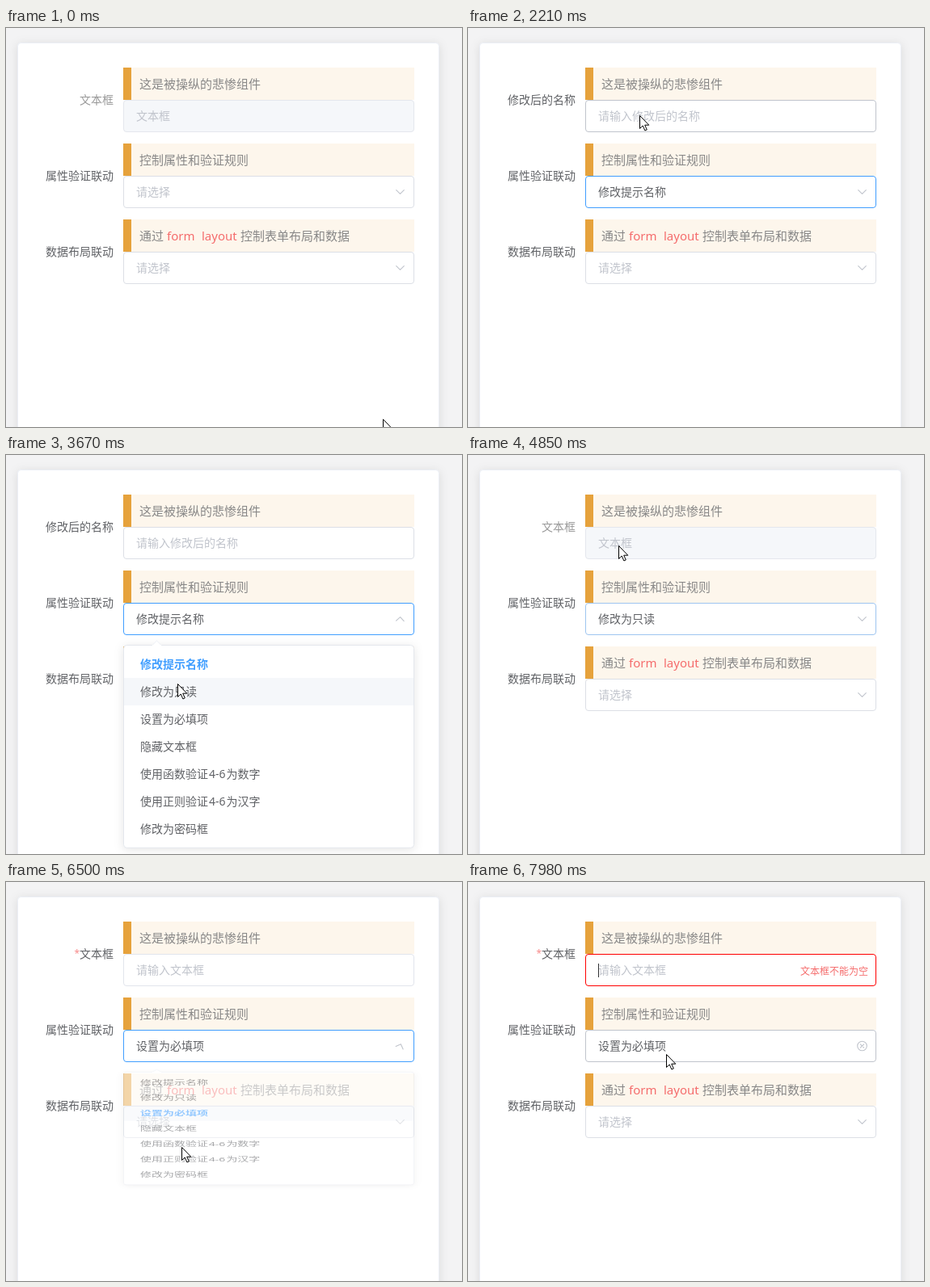
An HTML page for the animation above (8 s loop, 564x494 px).

```html
<!DOCTYPE html>
<html lang="zh-CN">
<head>
<meta charset="utf-8">
<title>表单联动</title>
<style>
html, body { margin: 0; width: 100%; height: 100%; overflow: hidden; background: #f3f3f4; }
svg { display: block; width: 564px; height: 494px; }
text { font: 14px "Noto Sans", "Noto Sans CJK SC", "Noto Sans CJK", sans-serif; fill: #606266; white-space: pre; }
.tip { font-size: 15px; fill: #888; }
.hint { fill: #c0c4cc; }
.red { fill: #f56c6c; }
.small { font-size: 12px; }
.icon { fill: none; stroke: #c0c4cc; stroke-width: 1.1; stroke-linecap: round; stroke-linejoin: round; }
.shadow { filter: drop-shadow(0 2px 6px rgba(0, 0, 0, .1)); }
</style>
</head>
<body>
<svg id="stage" viewBox="0 0 564 494"></svg>
<script>
const LOOP = 8000, STEP = 73;
const OPTIONS = ['修改提示名称', '修改为只读', '设置为必填项', '隐藏文本框',
  '使用函数验证4-6为数字', '使用正则验证4-6为汉字', '修改为密码框'];
const PLAIN = [220, 223, 230], HOVER = [192, 196, 204], BLUE = [64, 158, 255],
  OFF = [228, 231, 237], RED = [255, 0, 0];

// Pointer: start position, then moves as start, end, x, y
const HOME = [466, 484];
const MOVES = [
  [60, 280, 265, 177], [420, 560, 225, 208], [720, 940, 212, 240], [1020, 1300, 212, 253],
  [1460, 1960, 212, 105], [2060, 2430, 212, 117], [2570, 3310, 214, 205], [3450, 3650, 212, 283],
  [4120, 4700, 186, 112], [5080, 5400, 205, 205], [5500, 5810, 217, 328],
  [6500, 6860, 230, 97], [7400, 7680, 245, 213]];

const OPENED = [715, 3400, 5490], PICKED = [1445, 4100, 6463], INPUT_CLICKED = [4710, 6860];
const FAILED = INPUT_CLICKED[1];

// Field state for each chosen option; -1 means nothing chosen
const FIELD = {
  '-1': { label: '文本框', hint: '文本框', off: true },
  0: { label: '修改后的名称', hint: '请输入修改后的名称' },
  1: { label: '文本框', hint: '文本框', off: true },
  2: { label: '文本框', hint: '请输入文本框', must: true }
};

const clamp = v => Math.max(0, Math.min(1, v));
const mix = (a, b, p) => a + (b - a) * p;
const smooth = p => p * p * (3 - 2 * p);
const last = (times, t) => Math.max(-Infinity, ...times.filter(v => v <= t));

function bezier(x1, y1, x2, y2) {
  const at = (a, b, s) => 3 * a * s * (1 - s) ** 2 + 3 * b * s * s * (1 - s) + s ** 3;
  return v => {
    const x = clamp(v);
    let lo = 0, hi = 1;
    for (let i = 0; i < 24; i++) {
      const mid = (lo + hi) / 2;
      if (at(x1, x2, mid) < x) lo = mid; else hi = mid;
    }
    return at(y1, y2, hi);
  };
}
const zoomEase = bezier(.23, 1, .32, 1);
const turnEase = bezier(.25, .1, .25, 1);

function pointerAt(t) {
  let [x, y] = HOME;
  for (const [start, end, toX, toY] of MOVES) {
    const p = smooth(clamp((t - start) / (end - start)));
    x = mix(x, toX, p);
    y = mix(y, toY, p);
  }
  return [Math.round(x), Math.round(y)];
}

function isOver(top, t) {
  const [x, y] = pointerAt(t);
  return x > 145 && x < 505 && y >= top && y < top + 40;
}

const chosen = t => PICKED.filter(v => v <= t).length - 1;

function selectBorder(t) {
  if (last(OPENED, t) > last(INPUT_CLICKED, t)) return BLUE;
  return isOver(183, t) ? HOVER : PLAIN;
}

function inputBorder(t) {
  if (FIELD[chosen(t)].off) return OFF;
  if (t >= FAILED) return RED;
  return isOver(89, t) ? HOVER : PLAIN;
}

// A 200 ms colour fade: the mean of the border's recent states
function faded(border, t) {
  const sum = [0, 0, 0], n = 10;
  for (let k = 0; k < n; k++) border(t - 20 * k).forEach((v, i) => sum[i] += v / n);
  return `rgb(${sum.map(Math.round)})`;
}

const label = (y, str) => `<text x="133" y="${y + 5}" text-anchor="end">${str}</text>`;
const tip = (y, inner) =>
  `<path d="M145 ${y}h360v40h-360z" fill="#fdf6ec"/><path d="M145 ${y}h10v40h-10z" fill="#e6a23c"/>
   <text class="tip" x="165" y="${y + 26}">${inner}</text>`;
const box = (y, id) =>
  `<rect id="${id}" x="145.5" y="${y + .5}" width="359" height="39" rx="3.5" fill="#fff" stroke="rgb(${PLAIN})"/>
   <text id="${id}Text" class="hint" x="161" y="${y + 25}">请选择</text>`;
const chevron = (y, id) =>
  `<path id="${id}" class="icon" d="M-4.8 2.4L0 -2.4L4.8 2.4" transform="translate(487.5 ${y}) rotate(180)"/>`;
const option = (str, i) => `<text class="option" x="166" y="${264 + 34 * i}">${
  str.replace(/(4-6)(.*)/, '<tspan dx="1">$1</tspan><tspan dx="1">$2</tspan>')}</text>`;

const stage = document.getElementById('stage');
stage.innerHTML = `
  <rect width="564" height="494" fill="#f3f3f4"/>
  <rect class="shadow" x="14.5" y="18.5" width="521" height="520" rx="4" fill="#fff" stroke="#ebeef5"/>
  <text id="name" x="133" y="94" text-anchor="end"></text>
  <text id="star" class="red small" x="91" y="93" text-anchor="end" opacity=".8">*</text>
  ${tip(49, '这是被操纵的悲惨组件')}${box(89, 'input')}
  <path id="caret" d="M161.5 101v17" stroke="#303133"/>
  <text id="error" class="red small" x="411" y="114.5">文本框不能为空</text>
  ${label(183, '属性验证联动')}${tip(143, '控制属性和验证规则')}${box(183, 'select')}
  ${chevron(203, 'arrow')}
  <g id="clear" class="icon"><circle cx="487.5" cy="203" r="5.8"/><path d="M485.3 200.8l4.4 4.4m0 -4.4l-4.4 4.4"/></g>
  ${label(277, '数据布局联动')}
  ${tip(237, '通过<tspan class="red" x="199">form</tspan><tspan class="red" x="242">layout</tspan><tspan x="290">控制表单布局和数据</tspan>')}
  ${box(277, 'layout')}${chevron(297, 'layoutArrow')}
  <g id="menu">
    <rect class="shadow" x="145.5" y="235.5" width="359" height="251" rx="4" fill="#fff" stroke="#e4e7ed"/>
    <path d="M180.5 236l6 -6l6 6" fill="#fff" stroke="#ebeef5"/><path d="M181 235h11v2h-11z" fill="#fff"/>
    <rect id="row" x="146" width="358" height="34" fill="#f5f7fa"/>
    ${OPTIONS.map(option).join('')}
  </g>
  <path id="pointer" d="M0 0V16L3.7 12.5L6.4 18.5L8.8 17.4L6.2 11.7H11.3Z" fill="#fff" stroke="#000"/>`;

const el = {};
stage.querySelectorAll('[id]').forEach(e => el[e.id] = e);
const rows = [...stage.querySelectorAll('.option')];
const set = (e, attrs) => { for (const k in attrs) e.setAttribute(k, attrs[k]); };
const show = (e, on) => set(e, { visibility: on ? 'visible' : 'hidden' });

function drawField(t, value) {
  const field = FIELD[value];
  el.name.textContent = field.label;
  el.name.style.fill = field.off ? '#999' : '';
  show(el.star, field.must);
  el.inputText.textContent = field.hint;
  set(el.input, { fill: field.off ? '#f5f7fa' : '#fff', stroke: faded(inputBorder, t) });
  show(el.error, t >= FAILED);
  show(el.caret, t >= FAILED && Math.floor((t - FAILED) / 530) % 2 === 0);
}

function drawSelect(t, value, turn) {
  el.selectText.textContent = OPTIONS[value] || '请选择';
  el.selectText.style.fill = value < 0 ? '' : '#606266';
  set(el.select, { stroke: faded(selectBorder, t) });
  const clearable = value >= 0 && isOver(183, t);
  show(el.clear, clearable);
  show(el.arrow, !clearable);
  set(el.arrow, { transform: `translate(487.5 203) rotate(${turn})` });
}

function drawMenu(value, size, open, y) {
  show(el.menu, size > .002);
  set(el.menu, { opacity: size, transform: `translate(0 235) scale(1 ${size}) translate(0 -235)` });
  const over = Math.floor((y - 242) / 34);
  const active = open && OPTIONS[over] ? over : value;
  set(el.row, { y: 242 + 34 * active, opacity: active < 0 ? 0 : 1 });
  rows.forEach((r, i) => {
    r.style.fill = i === value ? '#409eff' : '';
    r.style.fontWeight = i === value ? 700 : 400;
  });
}

function draw(time) {
  const t = Math.floor(time / STEP) * STEP;
  const [x, y] = pointerAt(t);
  const value = chosen(t);
  const opened = last(OPENED, t), picked = last(PICKED, t);
  const open = opened > picked;
  const p = (t - Math.max(opened, picked)) / 300;
  const size = open ? zoomEase(p) : 1 - zoomEase(p);
  const turn = 180 * (open ? 1 - turnEase(p) : turnEase(p));

  drawField(t, value);
  drawSelect(t, value, turn);
  drawMenu(value, size, open, y);
  set(el.pointer, { transform: `translate(${x + .5} ${y + .5})` });
}

function tick() {
  draw(performance.now() % LOOP);
  requestAnimationFrame(tick);
}
tick();
</script>
</body>
</html>
```
